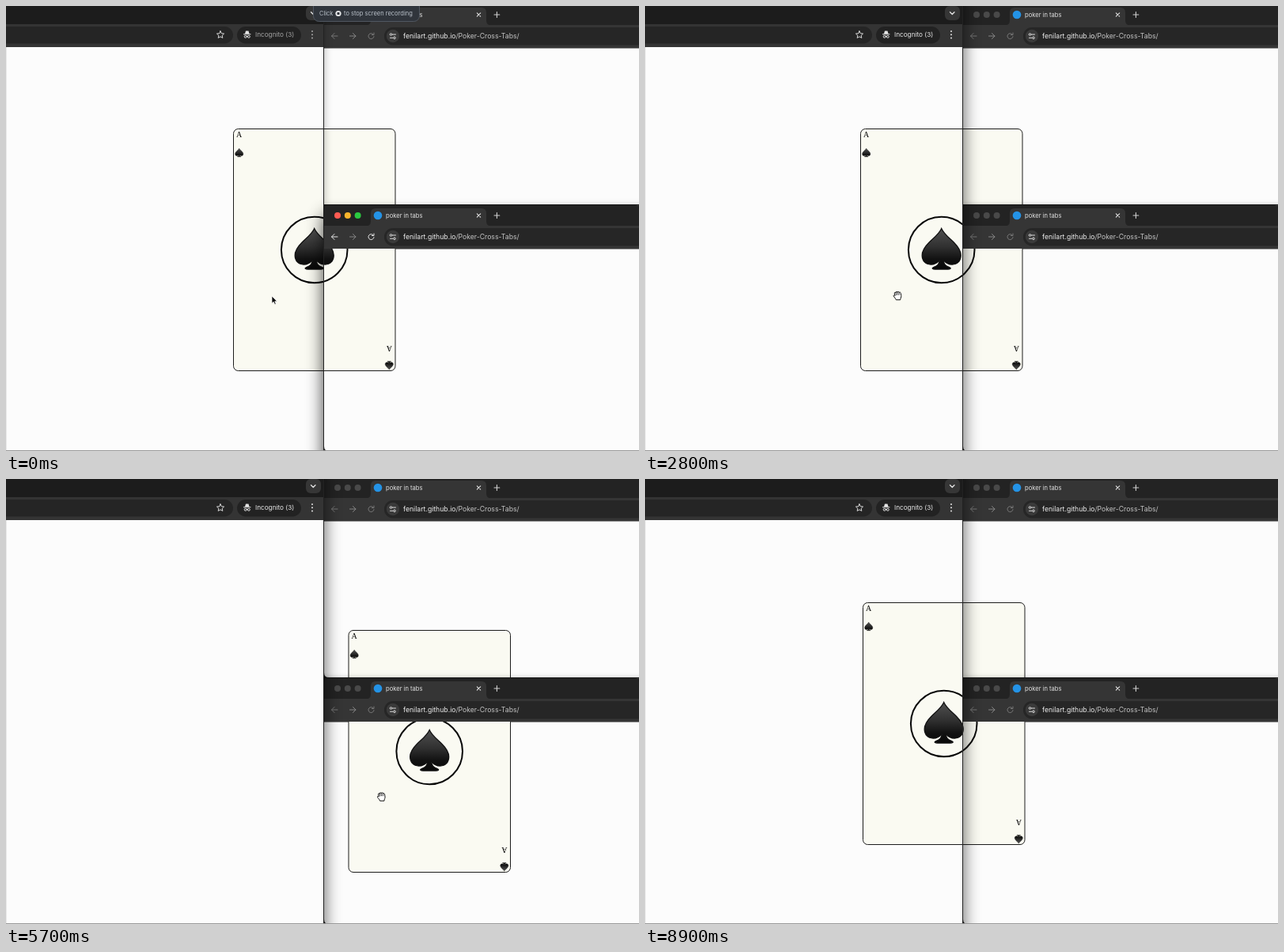
These frames come from a looping animation (800x563 px, 9500 ms). An HTML page:

```html
<!DOCTYPE html>
<html lang="en">
<head>
<meta charset="utf-8">
<title>Poker in tabs</title>
<style>
  html, body { margin: 0; width: 100%; height: 100%; overflow: hidden; background: #1c1c1c; }
  svg { display: block; }
  text { font-family: Inter, Roboto, sans-serif; }
  .rank { font: 10px "Liberation Serif", "Noto Serif", serif; text-anchor: middle; }
  .line { fill: none; stroke-linecap: round; stroke-linejoin: round; }
</style>
</head>
<body>
<svg id="stage" width="800" height="563" viewBox="0 0 800 563"></svg>
<script>
const LOOP = 9500, STEP = 100, FOCUS = 500, RELEASE = 7400;

// time, card left, card top
const cardPath = [
  [900, 287.5, 155.5], [1300, 276, 166], [1600, 262, 180], [1800, 252, 183],
  [1900, 245.5, 180], [2000, 216.5, 172], [2200, 178, 164], [2300, 170, 162],
  [2500, 190, 160], [2900, 300, 154], [3200, 348, 150], [3400, 342, 150],
  [3600, 293, 158], [3700, 232, 167], [3900, 103, 186], [4000, 91, 188],
  [4100, 104, 182], [4200, 155, 162], [4400, 320, 90], [4600, 465, 25],
  [4700, 494.5, 12.5], [5000, 495, 14], [5300, 483, 80], [5500, 460, 150],
  [5700, 433, 191.5], [5800, 395, 183], [5900, 344, 166], [6000, 300, 157],
  [6300, 232, 150], [6500, 240, 148], [6800, 285, 147], [7000, 305, 148],
  [7200, 288, 153], [7400, 275.5, 156.5]
];
const arrowPath = [[0, 336, 367], [300, 316.5, 366]];

const circle = (x, y, r, attrs) => `<circle cx="${x}" cy="${y}" r="${r}" ${attrs}/>`;
const rect = (x, y, w, h, fill, r = 0) =>
  `<rect x="${x}" y="${y}" width="${w}" height="${h}" rx="${r}" fill="${fill}"/>`;
const line = (d, color, width = 1) =>
  `<path class="line" d="${d}" stroke="${color}" stroke-width="${width}"/>`;
const label = (x, y, size, fill, body) =>
  `<text x="${x}" y="${y}" font-size="${size}" fill="${fill}">${body}</text>`;

const clip = (id, x, y, w, h) => `<clipPath id="${id}">${rect(x, y, w, h, "#000")}</clipPath>`;
const blur = (id, s) =>
  `<filter id="${id}" filterUnits="userSpaceOnUse" x="-100" y="-100" width="1100" height="800">
    <feGaussianBlur stdDeviation="${s}"/></filter>`;
const shadow = (area, x, y, w, h, filter, alpha) =>
  `<g clip-path="url(#${area})"><g filter="url(#${filter})" opacity="${alpha}">${rect(x, y, w, h, "#000")}</g></g>`;

const defs = `<defs>
  ${clip("leftPage", 0, 52, 401, 511)}
  ${clip("topPage", 402, 53, 398, 198)}
  ${clip("lowPage", 402, 307, 398, 256)}
  ${clip("leftHalf", 0, 52, 401, 511)}
  ${clip("rightHalf", 402, 0, 398, 563)}
  ${clip("topHalf", 402, 0, 398, 251)}
  ${blur("wide", 11)}${blur("mid", 6)}${blur("thin", 3.5)}
  <linearGradient id="gloss" x1="0" y1="0" x2="0" y2="1">
    <stop offset="0" stop-color="#505050"/><stop offset=".45" stop-color="#303030"/>
    <stop offset=".75" stop-color="#121212"/><stop offset="1" stop-color="#080808"/>
  </linearGradient>
  <path id="spade" fill="url(#gloss)" stroke="#111" stroke-width="1.3" d="M0-26
    C3-19 10-14 16-8 C22-2 24.5 3 24.5 8 C24.5 15 20 19.500 13.500 19.500
    C8.500 19.500 5 17 2.500 14 C2.500 19 5 21 10 23 C13 24.500 11 25.500 8 25.500
    H-8 C-11 25.500-13 24.500-10 23 C-5 21-2.500 19-2.500 14
    C-5 17-8.500 19.500-13.500 19.500 C-20 19.500-24.500 15-24.500 8
    C-24.500 3-22-2-16-8 C-10-14-3-19 0-26Z"/>
  <g id="card">
    <rect width="204.500" height="306" rx="6" fill="#fafaf2" stroke="#1c1c1c"/>
    ${circle(102.2, 153, 41.8, 'fill="none" stroke="#080808" stroke-width="2"')}
    <use href="#spade" x="102.200" y="152"/>
    <text class="rank" x="7.200" y="10">A</text>
    <use href="#spade" transform="translate(7.2 30) scale(.21)"/>
    <text class="rank" transform="translate(197 274.300) rotate(180)">A</text>
    <use href="#spade" transform="translate(196.8 299.300) scale(-.21)"/>
  </g>
</defs>`;

const cardIn = page => `<g clip-path="url(#${page})"><use class="card" href="#card"/></g>`;

function leftWindow() {
  const star = Array.from({ length: 10 }, (_, i) => {
    const a = i * Math.PI / 5, r = i % 2 ? 2.3 : 4.8;
    return `${(271 + r * Math.sin(a)).toFixed(2)} ${(36.5 - r * Math.cos(a)).toFixed(2)}`;
  }).join("L");
  return rect(0, 0, 401, 23, "#1c1c1c") + rect(0, 23, 401, 29, "#343434") +
    rect(-20, 26, 307, 21.5, "#252525", 10.7) + rect(292, 26, 81, 21.5, "#222", 10.7) +
    rect(379, 0, 19, 18, "#363636", 6) + line("M385.500 7.800L388.300 10.500L391 7.800", "#e4e4e4", 1.3) +
    line(`M${star}Z`, "#d8d8d8") +
    `<path d="M302 35L303 31.500H306.500L307.500 35Z" fill="#e4e4e4"/>` +
    line("M300.500 35.700H309M304 38.500H305.500", "#e4e4e4") +
    circle(302.7, 38.7, 1.5, 'fill="none" stroke="#e4e4e4"') +
    circle(306.8, 38.7, 1.5, 'fill="none" stroke="#e4e4e4"') +
    `<g id="leftText">${label(315, 39.3, 8.2, "#e8e8e8", "Incognito (3)")}
      ${[32, 36.3, 40.6].map(y => circle(387, y, 1, 'fill="#e4e4e4"')).join("")}</g>` +
    rect(0, 52, 401, 511, "#fcfcfc") + rect(0, 52, 0.6, 511, "#ddd") + cardIn("leftPage");
}

const dots = colors => colors.map((c, i) => circle(419 + i * 12.8, 11, 4, `fill="${c}"`)).join("");

function nav(back, next, load) {
  return line("M419 38H411.500M415 34.500L411.500 38L415 41.500", back) +
    line("M434.500 38H442M438.500 34.500L442 38L438.500 41.500", next) +
    line("M464.300 36A3.500 3.500 0 1 0 465 38.500M465 34V36.500H462.400", load);
}

function tabWindow(y, page, pageHeight, states) {
  return `<g transform="translate(0 ${y})">
    ${rect(402, -2, 398, 27, "#232323", 5)}${rect(402, 5, 398, 20, "#232323")}
    <path d="M455 24.500Q461 24.500 461 18V8Q461 2 467 2H601Q607 2 607 8V18Q607 24.500 613 24.500Z" fill="#353535"/>
    ${rect(402, 24, 398, 29.5, "#353535")}${rect(478, 27, 340, 22.5, "#262626", 11)}
    ${circle(470, 11, 5.3, 'fill="#2493e6"')}
    ${label(480, 13.7, 7.6, "#e2e2e2", "poker in tabs")}
    ${line("M595.300 8.800L599.700 13.200M599.700 8.800L595.300 13.200", "#e0e0e0", 1.1)}
    ${line("M617 11H623.800M620.400 7.600V14.400", "#d0d0d0", 1.1)}
    ${circle(489, 38, 8.2, 'fill="#3a3a3a"')}
    ${line("M488.500 36H492.500M485.500 40.300H489", "#ddd")}
    ${circle(486.5, 36, 1.3, 'fill="none" stroke="#ddd"')}${circle(491, 40.3, 1.3, 'fill="none" stroke="#ddd"')}
    ${label(502, 41.2, 8.67, "#ececec", 'fenilart.github.io<tspan fill="#c4c4c4">/Poker-Cross-Tabs/</tspan>')}
    ${states}
    <path d="M402 53.500H800V${53 + pageHeight}H408Q402 ${53 + pageHeight} 402 ${47 + pageHeight}Z" fill="#fcfcfc"/>
  </g>` + cardIn(page);
}

const grey = Array(3).fill("#494949");
const idle = dots(grey) + nav("#777", "#858585", "#777");
const active = dots(["#ff5b52", "#f6b32c", "#2bc840"]) + nav("#e4e4e4", "#858585", "#e4e4e4");

document.getElementById("stage").innerHTML = defs + leftWindow() +
  tabWindow(0, "topPage", 198, idle) +
  rect(402, 251, 398, 1, "#141414") + rect(407, 252, 393, 0.7, "#4c4c4c") +
  tabWindow(254, "lowPage", 256,
    `<g class="before">${active}</g><g class="after">${idle}</g>`) +
  rect(401, 0, 1, 563, "#222") +
  `<g class="before">
    ${shadow("leftHalf", 402, 264, 500, 400, "wide", 0.8)}
    ${shadow("topHalf", -100, 0, 501, 600, "mid", 0.35)}
    ${shadow("topHalf", 402, 256, 500, 300, "mid", 0.5)}
  </g>
  <g class="after">
    ${shadow("rightHalf", -100, -20, 501, 700, "wide", 0.7)}
    ${shadow("topHalf", 402, 252, 500, 300, "thin", 0.3)}
  </g>` +
  rect(0, 562, 800, 1, "#999") +
  `<g id="pill"><rect x="388.500" y="-8" width="134" height="27.500" rx="7" fill="#30353c" stroke="#505761"/>
    ${label(396, 12.3, 7.4, "#b9c0c9", "Click")}
    ${circle(420, 9.5, 3.6, 'fill="#e6e8ea"')}${rect(418.5, 8, 3, 3, "#30353c", 0.5)}
    ${label(427, 12.3, 7.5, "#b9c0c9", "to stop screen recording")}
  </g>
  <path id="arrow" d="M0 0V9.200L2.200 7.300L3.700 10.600L5.200 9.900L3.800 6.700H6.600Z" fill="#080808" stroke="#fff" stroke-width=".7"/>
  <g id="hand">
    <path class="line" style="fill:#fff" stroke="#111" stroke-width="1"
      d="M-2.500 5.500C-3-.500 2-5 1.500-5 1-2.800C0-4.800.200-5.500 1.200-5.300L2-2.800C2-4.500 3.600-4.800 3.900-3.300L4.700.500C5 2.500 4 3.500 3.500 5.500Z" visibility="hidden"/>
    <path class="line" style="fill:#fff" stroke="#111" stroke-width="1"
      d="M-2 5.300C-2.500 3.600-4.600 2.200-5 .700C-5.200-.300-4-.600-3.200.500L-3.900-2.700C-4-4-2.600-4.300-2.200-3.100C-2.500-4.900-.600-5.300-.200-3.800C0-5.200 1.800-5 2-3.500C2.500-4.500 3.900-4 4-2.700L4.600.500C4.800 2.500 3.600 3.500 3.500 5.300Z"/>
    ${line("M-2.200-3.100L-1.600-.500M-.200-3.800L.100-.800M2-3.500L1.900-.700", "#111", 0.8)}
  </g>`;

const $ = id => document.getElementById(id);
const all = name => document.querySelectorAll(name);
const cards = all(".card"), before = all(".before"), after = all(".after");
const show = (el, on) => el.style.visibility = on ? "visible" : "hidden";
const place = (el, [x, y]) => el.setAttribute("transform", `translate(${x} ${y})`);

function at(path, t) {
  const i = path.findIndex(k => k[0] >= t);
  if (i < 0) return path[path.length - 1].slice(1);
  if (i === 0) return path[0].slice(1);
  const a = path[i - 1], b = path[i], p = (t - a[0]) / (b[0] - a[0]);
  return [1, 2].map(n => a[n] + (b[n] - a[n]) * p);
}

function draw(now) {
  const t = Math.floor(now % LOOP / STEP) * STEP;
  const pos = at(cardPath, t), focused = t >= FOCUS;
  cards.forEach(c => place(c, pos));
  before.forEach(g => show(g, !focused));
  after.forEach(g => show(g, focused));
  $("leftText").setAttribute("opacity", focused ? 1 : 0.65);
  $("pill").setAttribute("opacity", Math.max(0, 1 - t / 300));
  place($("arrow"), at(arrowPath, t));
  show($("arrow"), !focused);

  // the card trails the hand slightly on fast moves
  const next = at(cardPath, t + STEP);
  place($("hand"), [0, 1].map(n => pos[n] + [44.5, 210.7][n] + (next[n] - pos[n]) * 0.08));
  show($("hand"), focused && t < RELEASE);
}

const start = performance.now();
function tick() {
  draw(performance.now() - start);
  requestAnimationFrame(tick);
}
tick();
</script>
</body>
</html>
```
